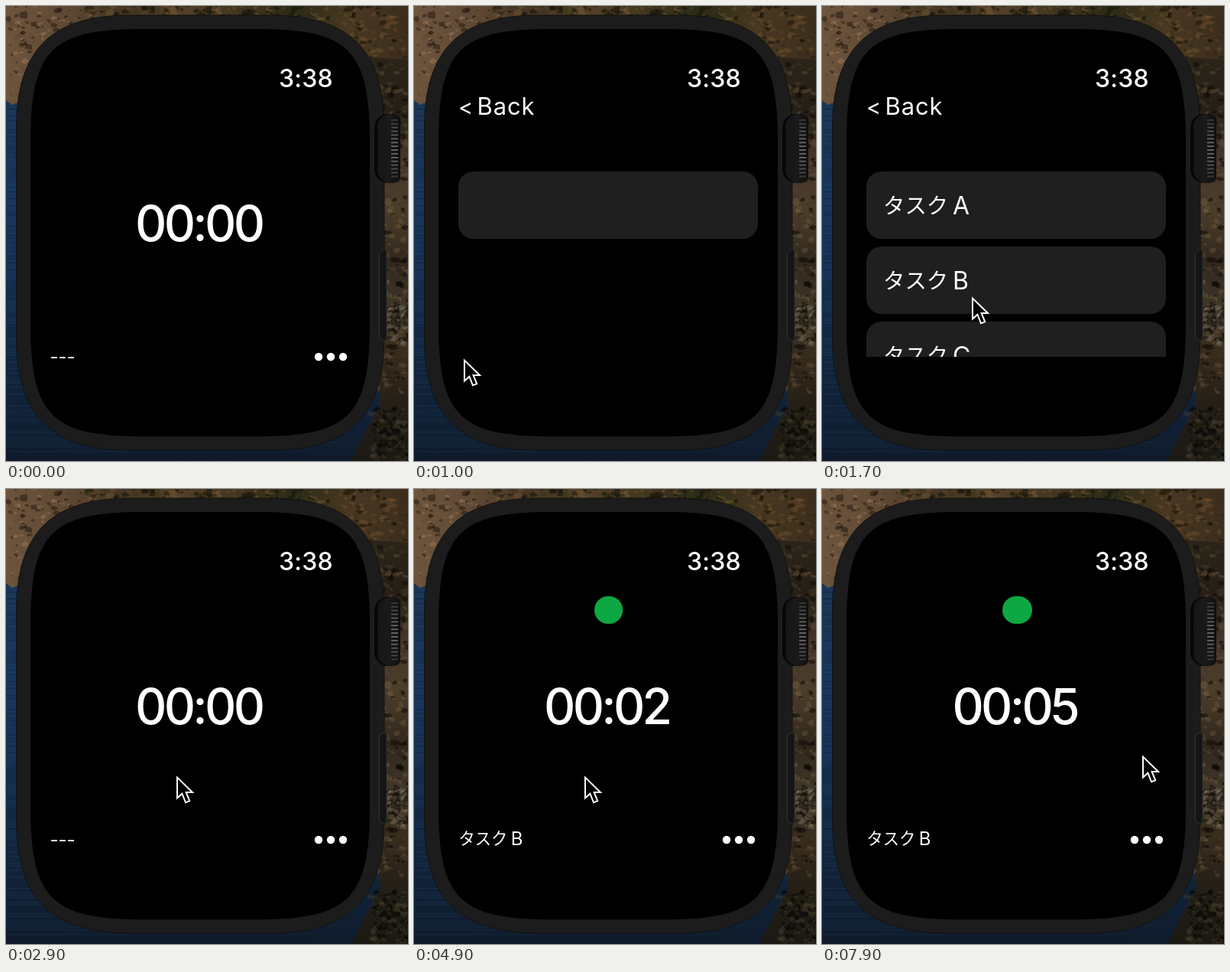
An HTML page with a canvas for the animation above (8 s loop, 526 px wide and 594 px high).

```html
<!DOCTYPE html>
<html lang="ja">
<head>
<meta charset="utf-8">
<title>Watch timer</title>
<style>
html, body { margin: 0; width: 100%; height: 100%; overflow: hidden; background: #000; }
canvas { display: block; }
</style>
</head>
<body>
<canvas id="stage" width="526" height="594"></canvas>
<script>
const W = 526, H = 594, LOOP = 8000, STEP = 100;
const ctx = document.getElementById('stage').getContext('2d');
const LATIN = 'Inter, "Open Sans", sans-serif';
const KANA = '"Noto Sans CJK JP", "Noto Sans CJK", sans-serif';

let seed = 11;
const rnd = () => (seed = (seed * 16807) % 2147483647) / 2147483647;

function poly(g, pts, fill) {
  g.beginPath();
  pts.forEach(([x, y]) => g.lineTo(x, y));
  g.closePath();
  g.fillStyle = fill;
  g.fill();
}

function box(g, x, y, w, h, r, fill, line) {
  g.beginPath();
  g.roundRect(x, y, w, h, r);
  g.fillStyle = fill;
  g.fill();
  if (line) { g.strokeStyle = line; g.lineWidth = 1; g.stroke(); }
}

function fade(g, x0, y0, x1, y1, colors) {
  const f = g.createLinearGradient(x0, y0, x1, y1);
  colors.forEach((c, i) => f.addColorStop(i / (colors.length - 1), c));
  return f;
}

// Rounded box whose corners reach e along each side, pulled in by k
function softBox(g, x, y, w, h, e, k) {
  const r = x + w, b = y + h, c = e * k;
  g.beginPath();
  g.moveTo(x + e, y);
  g.lineTo(r - e, y);
  g.bezierCurveTo(r - c, y, r, y + c, r, y + e);
  g.lineTo(r, b - e);
  g.bezierCurveTo(r, b - c, r - c, b, r - e, b);
  g.lineTo(x + e, b);
  g.bezierCurveTo(x + c, b, x, b - c, x, b - e);
  g.lineTo(x, y + e);
  g.bezierCurveTo(x, y + c, x + c, y, x + e, y);
  g.closePath();
}

function flecks(g, n, x, y, w, h, tones) {
  for (let i = 0; i < n; i++) {
    const px = x + rnd() * w, py = y + rnd() * h, s = 1 + rnd() * 4;
    const pts = [];
    for (let a = 0; a < 5; a++) {
      const d = s * (0.3 + rnd());
      pts.push([px + Math.cos(a * 1.26) * d * 1.4, py + Math.sin(a * 1.26) * d]);
    }
    poly(g, pts, tones[Math.floor(rnd() * tones.length)]);
  }
}

function drawCoast(g) {
  g.fillStyle = fade(g, 0, 120, 0, H, ['#1a3454', '#183659', '#153052', '#12273f', '#0f1c2d']);
  g.fillRect(0, 0, W, H);
  for (let y = 128; y < H; y += 3) {
    g.fillStyle = rnd() < 0.5 ? 'rgba(90,130,180,.07)' : 'rgba(0,5,20,.15)';
    g.fillRect(rnd() * 60 - 50, y, 60 + rnd() * 440, 1.2);
  }
  // cliff along the top
  poly(g, [[0, 0], [W, 0], [W, 150], [60, 150], [20, 124], [8, 129], [0, 123]],
    fade(g, 0, 0, W, 0, ['#6d543c', '#604a35', '#453522', '#543f27', '#453720', '#2b2a17', '#4a3822', '#3b2e1c']));
  flecks(g, 200, 0, 0, 110, 122, ['rgba(28,20,14,.5)', 'rgba(165,128,96,.4)', 'rgba(92,68,48,.5)']);
  flecks(g, 260, 100, 0, 320, 26, ['rgba(18,16,8,.5)', 'rgba(130,98,58,.35)', 'rgba(54,56,24,.45)']);
  flecks(g, 140, 410, 0, 116, 75, ['rgba(22,18,8,.55)', 'rgba(125,88,50,.35)', 'rgba(48,48,22,.5)']);
  // cliff down the right side
  poly(g, [[455, 66], [W, 70], [W, H], [452, H], [466, 566], [476, 546], [490, 522], [480, 440], [470, 300]],
    fade(g, 0, 70, 0, H, ['#2a2419', '#261f16', '#45362a', '#4c3d2a', '#30271c', '#403829', '#35291b', '#231e15', '#1b1913']));
  flecks(g, 380, 476, 76, 50, 430, ['rgba(12,9,5,.55)', 'rgba(125,100,70,.35)', 'rgba(66,54,36,.5)']);
  flecks(g, 70, 494, 392, 32, 50, ['rgba(140,128,108,.35)', 'rgba(14,12,10,.55)']);
  flecks(g, 130, 478, 525, 48, 69, ['rgba(8,7,5,.55)', 'rgba(74,66,44,.35)']);
}

function drawWatch(g) {
  softBox(g, 13.5, 12, 481.5, 568, 150, 0.3);
  g.fillStyle = '#1c1c1c';
  g.fill();
  g.strokeStyle = '#111';
  g.lineWidth = 1;
  g.stroke();
  softBox(g, 32, 30, 444, 532, 150, 0.175);
  g.fillStyle = '#000';
  g.fill();
  // crown
  box(g, 482, 141, 30, 90, [18, 6, 6, 18], '#060606');
  box(g, 486, 141.5, 30, 89, [16, 7, 7, 16], fade(g, 486, 0, 516, 0, ['#151515', '#1a1a1a', '#0f0f0f']));
  for (let y = 148; y < 226; y += 4.9) {
    const lit = 45 + 60 * Math.sin((y - 143) / 86 * Math.PI);
    g.fillStyle = `rgb(${lit},${lit},${lit})`;
    g.fillRect(504, y, 9, 1.8);
  }
  // side button
  box(g, 488.5, 318, 9.5, 119, [8, 2, 2, 8], '#141414', '#333');
}

const back = document.createElement('canvas');
back.width = W;
back.height = H;
drawCoast(back.getContext('2d'));
drawWatch(back.getContext('2d'));

function text(str, x, y, size, weight = 400, gap = 0, align = 'left', font = LATIN) {
  ctx.font = `${weight} ${size}px ${font}`;
  ctx.letterSpacing = gap + 'px';
  ctx.textAlign = align;
  ctx.fillStyle = '#fff';
  ctx.fillText(str, x, y);
}

function task(letter, x, y, scale) {
  text('タスク', x, y - scale, 28.4 * scale, 300, 0, 'left', KANA);
  text(letter, x + 91 * scale, y, 32 * scale);
}

function timerScreen(sec) {
  if (sec) box(ctx, 236, 140, 36 + sec * 0.6, 36, 18, '#0da843');
  text('00:' + String(sec).padStart(2, '0'), 252.2, 307, 64, 500, -3.7, 'center');
  if (sec) task('B', 58.5, 465, 0.75);
  else text('---', 57.5, 466, 24);
  ctx.fillStyle = '#fff';
  for (let i = 0; i < 3; i++) {
    ctx.beginPath();
    ctx.arc(409 + i * 16, 458, 5.2, 0, 7);
    ctx.fill();
  }
}

function listScreen(loaded) {
  text('<', 58, 142, 29);
  text('Back', 82.5, 142, 31, 400, 0.9);
  ctx.save();
  ctx.beginPath();
  ctx.rect(32, 200, 444, 258);
  ctx.clip();
  (loaded ? ['A', 'B', 'C'] : ['']).forEach((name, i) => {
    const y = 216 + i * 98;
    box(ctx, 58, y, 392, 88, 20, '#1f1f1f');
    if (name) task(name, 80, y + 56, 1);
  });
  ctx.restore();
}

// time, x, y
const path = [
  [100, -26, 545], [800, 65, 460], [1200, 65, 460], [1700, 196, 379],
  [2100, 223, 374], [6500, 223, 374], [6600, 225, 374], [7100, 419, 347]
];

function pointer(t) {
  let i = path.findIndex(p => p[0] > t);
  if (i === 0) return;
  if (i < 0) i = path.length;
  const a = path[i - 1], b = path[i] || a;
  const u = b === a ? 0 : (t - a[0]) / (b[0] - a[0]);
  const e = 1 - (1 - u) ** 2;
  ctx.save();
  ctx.translate(a[1] + (b[1] - a[1]) * e, a[2] + (b[2] - a[2]) * e);
  ctx.beginPath();
  [[1, 2.5], [1, 29.5], [7.4, 23.7], [12, 35.3], [17.2, 33.1], [12.6, 22], [21, 22]]
    .forEach(([x, y]) => ctx.lineTo(x, y));
  ctx.closePath();
  ctx.fillStyle = '#000';
  ctx.fill();
  ctx.strokeStyle = '#fff';
  ctx.lineWidth = 2;
  ctx.stroke();
  ctx.restore();
}

const ticks = [3900, 4900, 5700, 6700, 7700];

function draw(now) {
  const t = Math.floor((now % LOOP) / STEP) * STEP;
  ctx.drawImage(back, 0, 0);
  text('3:38', 427.8, 106, 32, 500, 0.2, 'right');
  if (t >= 1000 && t < 2900) listScreen(t >= 1300);
  else timerScreen(ticks.filter(k => t >= k).length);
  pointer(t);
}

let start;
function frame(now) {
  start ??= now;
  draw(now - start);
  requestAnimationFrame(frame);
}
draw(0);
requestAnimationFrame(frame);
</script>
</body>
</html>
```
